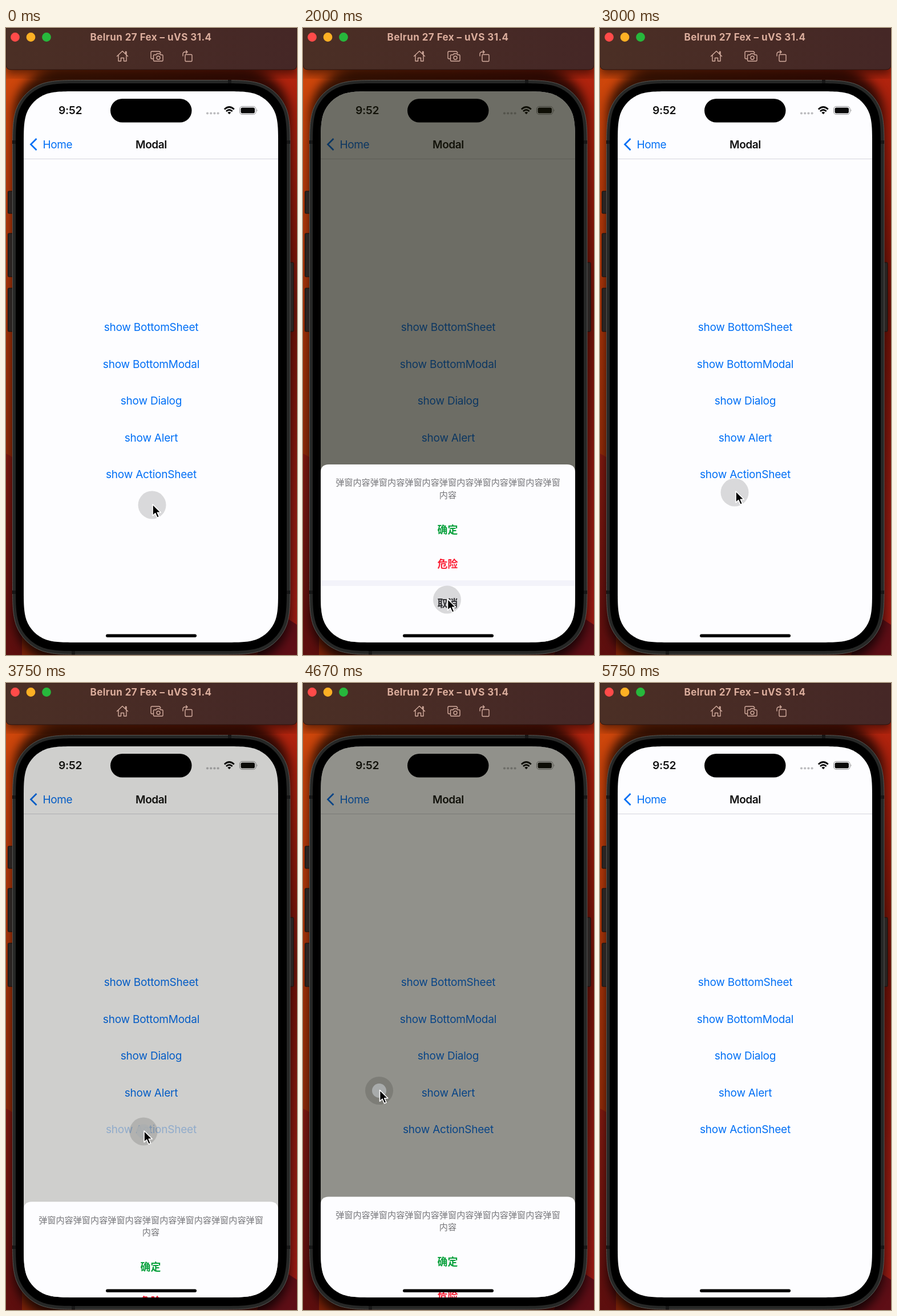
These frames come from a looping animation (510 px wide and 1099 px high, 6.33 s). An HTML page:

```html
<!DOCTYPE html>
<html lang="zh-CN">
<head>
<meta charset="utf-8">
<title>Modal demo</title>
<style>
  html, body { margin: 0; width: 100%; height: 100%; overflow: hidden; background: #7a1a0c; }
  svg { display: block; width: 100vw; height: 100vh; }
  text { font-family: Inter, "Noto Sans", sans-serif; font-size: 19px; letter-spacing: -.4px; }
  .mid { text-anchor: middle; }
  .semi { font-weight: 600; fill: #111; }
  .link { fill: #006ff5; }
  #links text { letter-spacing: -.22px; }
  .cjk text { font-family: "Noto Sans CJK SC", "Noto Sans CJK", sans-serif; letter-spacing: 0; text-anchor: middle; }
  .cjk .note { font-size: 15.15px; fill: #76767a; }
  .cjk .act { font-size: 17.9px; font-weight: 700; }
  .tool { fill: none; stroke: #d3ac9e; stroke-width: 1.4; stroke-linejoin: round; stroke-linecap: round; }
</style>
</head>
<body>
<svg viewBox="0 0 510 1099" preserveAspectRatio="none">
  <defs>
    <linearGradient id="left" x2="0" y2="1">
      <stop offset="0" stop-color="#d84c0c"/><stop offset=".25" stop-color="#b83a0a"/>
      <stop offset=".7" stop-color="#8e2a08"/><stop offset="1" stop-color="#7c2208"/>
    </linearGradient>
    <linearGradient id="low" x2="0" y2="1">
      <stop offset="0" stop-color="#801a10"/><stop offset="1" stop-color="#5c0e0e"/>
    </linearGradient>
    <linearGradient id="right" x2="0" y2="1">
      <stop offset="0" stop-color="#c42a10"/><stop offset=".15" stop-color="#a01e0c"/>
      <stop offset=".45" stop-color="#6c1208"/><stop offset=".75" stop-color="#8c1a10"/>
      <stop offset="1" stop-color="#a01c14"/>
    </linearGradient>
    <linearGradient id="bar">
      <stop offset="0" stop-color="#4b2f25"/><stop offset="1" stop-color="#452726"/>
    </linearGradient>
    <linearGradient id="blend">
      <stop offset=".1" stop-color="#fff" stop-opacity="0"/><stop offset=".9" stop-color="#fff"/>
    </linearGradient>
    <mask id="fade"><rect width="510" height="1099" fill="url(#blend)"/></mask>
    <filter id="soft" x="-20%" y="-40%" width="140%" height="180%"><feGaussianBlur stdDeviation="9"/></filter>
    <clipPath id="screen"><path id="glass"/></clipPath>
  </defs>

  <rect width="510" height="1099" fill="url(#left)"/>
  <path d="M0 746Q14 752 28 766V1099H0Z" fill="url(#low)"/>
  <g mask="url(#fade)">
    <rect width="510" height="1099" fill="url(#right)"/>
    <path d="M470 1020L510 1046V1099H440Z" fill="#5e0e16"/>
  </g>
  <rect x="13" y="72" width="484" height="1040" rx="80" opacity=".75" filter="url(#soft)"/>
  <rect x="0" y="58" width="510" height="22" opacity=".6" filter="url(#soft)"/>

  <path d="M0 0H510V64Q510 73 501 73H9Q0 73 0 64Z" fill="url(#bar)" stroke="#2a1410"/>
  <circle cx="16" cy="16" r="7.900" fill="#ff4b49"/>
  <circle cx="43.500" cy="16" r="7.900" fill="#fdb024"/>
  <circle cx="71" cy="16" r="7.900" fill="#27b83c"/>
  <text class="mid" x="254" y="22" fill="#dcae9d" style="font-size:17px;font-weight:700;letter-spacing:.45px">Belrun 27 Fex – uVS 31.4</text>
  <g class="tool">
    <path d="M194.500 49.500L204 40.500L213.500 49.500M197 47.500V58H201.500V52.500H206.500V58H211V47.500M209.500 44.500V41.500H211V46"/>
    <path d="M257.500 54H256Q254 54 254 52V43Q254 41 256 41H268Q270 41 271 44"/>
    <path d="M260 47H263L264.500 45H269.500L271 47H273.500Q275 47 275 48.500V56.500Q275 58 273.500 58H260Q258.500 58 258.500 56.500V48.500Q258.500 47 260 47Z"/>
    <circle cx="267" cy="52.300" r="3"/>
    <rect x="314" y="46.500" width="12" height="12" rx="1.500"/>
    <path d="M310 49V46Q310 42 314 42H318M315.500 39.500L318 42L315.500 44.500"/>
  </g>

  <g fill="#2a2422" stroke="#15100e">
    <rect x="3.500" y="286" width="9" height="39" rx="1.500"/>
    <rect x="3.500" y="360" width="9" height="76" rx="1.500"/>
    <rect x="3.500" y="456" width="9" height="76" rx="1.500"/>
    <rect x="496" y="411" width="8" height="121" rx="1.500"/>
  </g>
  <path id="frame" fill="#262726" stroke="#555653"/>
  <path d="M11 197h6v6h-6zM492 197h6v6h-6zM11 986h6v6h-6zM492 986h6v6h-6zM389 91h6v6h-6zM115 1092h6v6h-6z" fill="#171717"/>
  <path id="bezel"/>

  <g clip-path="url(#screen)">
    <rect x="31" y="111" width="446" height="966" fill="#fdfdff"/>
    <path d="M31 229.500H477" stroke="#d4d4dc"/>
    <text class="semi" x="92" y="151" style="font-size:19.300px;letter-spacing:-.3px">9:52</text>
    <g fill="#bcbcbf">
      <circle cx="353" cy="149.500" r="2.100"/><circle cx="359.200" cy="149.500" r="2.100"/>
      <circle cx="365.400" cy="149.500" r="2.100"/><circle cx="371.600" cy="149.500" r="2.100"/>
    </g>
    <g fill="none" stroke="#0a0a0a" stroke-width="2.700">
      <path d="M382.800 142.500Q391.300 134.500 399.800 142.500M385.900 146Q391.300 141 396.700 146"/>
      <path d="M391.300 151.300L388.300 148.200Q391.300 145.800 394.300 148.200Z" fill="#0a0a0a" stroke="none"/>
    </g>
    <rect x="409.500" y="137.500" width="28.500" height="14" rx="4.500" fill="none" stroke="#8f8f92"/>
    <rect x="411.500" y="139.500" width="24.500" height="10" rx="2.800" fill="#0a0a0a"/>
    <path d="M439.500 142.300Q441.500 144.500 439.500 146.700Z" fill="#8f8f92"/>
    <path d="M53.500 194L43.500 204L53.500 214" fill="none" stroke="#006ff5" stroke-width="2.700"/>
    <text class="link" x="64.500" y="211">Home</text>
    <text class="semi mid" x="254.500" y="211">Modal</text>
    <g id="links"></g>

    <rect id="dim" x="31" y="111" width="446" height="966" fill="#121204"/>
    <g id="sheet" class="cjk">
      <path d="M31 1099V779Q31 765 45 765H463Q477 765 477 779V1099Z" fill="#fdfdff"/>
      <rect x="31" y="968" width="446" height="10" fill="#f3f3fa"/>
      <text id="note" class="note" x="254" y="802.300"></text>
      <text class="note" x="254" y="823.800">内容</text>
      <text class="act" x="253.500" y="885.500" fill="#08a03c">确定</text>
      <text class="act" x="253.500" y="945.500" fill="#fb1e34">危险</text>
      <text class="act" x="253.500" y="1014.500" fill="#3c3c40">取消</text>
    </g>
    <rect x="175" y="1062.500" width="159" height="5.500" rx="2.750"/>
  </g>
  <rect x="183" y="124" width="142.500" height="41.500" rx="20.750"/>

  <g id="pointer">
    <g id="touch">
      <circle r="24.500" opacity=".14"/>
      <circle id="dot" fill="#abafb0"/>
    </g>
    <path id="arrow" d="M0 0V19.800L4.600 15.500L8 23.300L11.500 21.800L8.200 14.200H14.300Z" stroke="#fff" stroke-width="1.600" stroke-linejoin="round"/>
  </g>
</svg>
<script>
const LOOP = 6330, SHEET_H = 312, SLIDE = 250, DIM = 0.61, LAG = 40, EXIT = 5750;
const $ = id => document.getElementById(id);

// Pointer path: time, x, y
const path = [
  [0, 256, 836], [420, 260, 805], [660, 258, 780], [1170, 258, 780],
  [1460, 255.5, 880.5], [1800, 250.5, 965], [1960, 252.5, 1002], [2400, 252.5, 1002],
  [2790, 238, 836.5], [2940, 238, 836.5], [2960, 236, 814], [3000, 237, 813],
  [3290, 241, 786], [3880, 241, 786], [3920, 220, 779], [4210, 133, 733],
  [4290, 133.5, 714.5], [4830, 133.5, 714.5], [5130, 151.5, 718.5],
  [5420, 290, 850], [5700, 473, 1090]
];
const presses = [920, 2250, 3670, 4580];
// Sheet moves: start time, opening or closing
const slides = [[1013, 1], [2278, 0], [3670, 1], [4608, 0]];
const labels = ['BottomSheet', 'BottomModal', 'Dialog', 'Alert', 'ActionSheet'];

// Rectangle with continuous corners, built from one corner curve turned four times
function squircle(x, y, w, h, r) {
  const half = [
    [0, 1.5287], [0, 1.0885], [0, 0.8684], [0.0749, 0.6315], [0.1691, 0.3728]
  ];
  const curve = [...half, ...half.map(([a, b]) => [b, a]).reverse()];
  const corner = (right, low) => {
    const pts = right === low ? curve : [...curve].reverse();
    const [first, ...rest] = pts.map(([a, b]) =>
      [right ? x + w - a * r : x + a * r, low ? y + h - b * r : y + b * r].join(' '));
    return `${first}C${rest.join(' ')}`;
  };
  return `M${corner(0, 0)}L${corner(1, 0)}L${corner(1, 1)}L${corner(0, 1)}Z`;
}
$('frame').setAttribute('d', squircle(11.5, 91.5, 486.5, 1006.5, 82));
$('bezel').setAttribute('d', squircle(17, 97, 475, 995, 76));
$('glass').setAttribute('d', squircle(31, 111, 446, 966, 62.4));

$('note').textContent = '弹窗内容'.repeat(6) + '弹窗';
labels.forEach((label, i) => {
  const el = document.createElementNS('http://www.w3.org/2000/svg', 'text');
  el.setAttribute('class', 'link mid');
  el.setAttribute('x', 254.5);
  el.setAttribute('y', 531 + i * 64.5);
  el.textContent = 'show ' + label;
  $('links').append(el);
});
const action = $('links').lastChild;

const clamp = v => Math.min(1, Math.max(0, v));
const mix = (a, b, u) => a + (b - a) * u;
const easeOut = u => 1 - (1 - u) ** 2;
const move = (el, x, y) => el.setAttribute('transform', `translate(${x} ${y})`);

function pointerAt(t) {
  const i = path.findIndex(p => p[0] > t);
  if (i < 0) return path[path.length - 1].slice(1);
  if (i === 0) return path[0].slice(1);
  const [t0, x0, y0] = path[i - 1], [t1, x1, y1] = path[i];
  const u = (t - t0) / (t1 - t0);
  return [mix(x0, x1, u), mix(y0, y1, u)];
}

// Twelve pictures a second, on a 10 ms grid
function hold(t) {
  const at = k => Math.round(k * 100 / 12) * 10;
  const k = Math.floor(t * 12 / 1000) + 1;
  return at(k) <= t ? at(k) : at(k - 1);
}

function draw(t) {
  let shown = 0, dark = 0;
  for (const [start, open] of slides) {
    if (t < start) break;
    const u = clamp((t - start) / SLIDE);
    shown = open ? easeOut(u) : 1 - easeOut(u);
    dark = open ? u : 1 - u;
  }
  move($('sheet'), 0, SHEET_H * (1 - shown));
  $('sheet').style.display = shown ? '' : 'none';
  $('dim').setAttribute('opacity', DIM * dark);

  const since = t - (presses.filter(p => p <= t).pop() ?? -LOOP);
  const grow = clamp((since - 160) / 260);
  $('dot').setAttribute('r', mix(12.5, 23, grow));
  $('dot').setAttribute('opacity', 0.92 * (1 - grow ** 2));

  const tapped = [presses[0], presses[2]].some(p => t >= p && t < p + 500);
  action.setAttribute('opacity', tapped ? mix(0.3, 1, clamp((since - 80) / 160)) : 1);

  const [x, y] = pointerAt(t);
  move($('arrow'), x + 1, y - 1);
  move($('touch'), ...pointerAt(t - LAG));
  $('pointer').style.display = t < EXIT ? '' : 'none';
}

const begin = performance.now();
function tick() {
  draw(hold((performance.now() - begin) % LOOP));
  requestAnimationFrame(tick);
}
tick();
</script>
</body>
</html>
```
